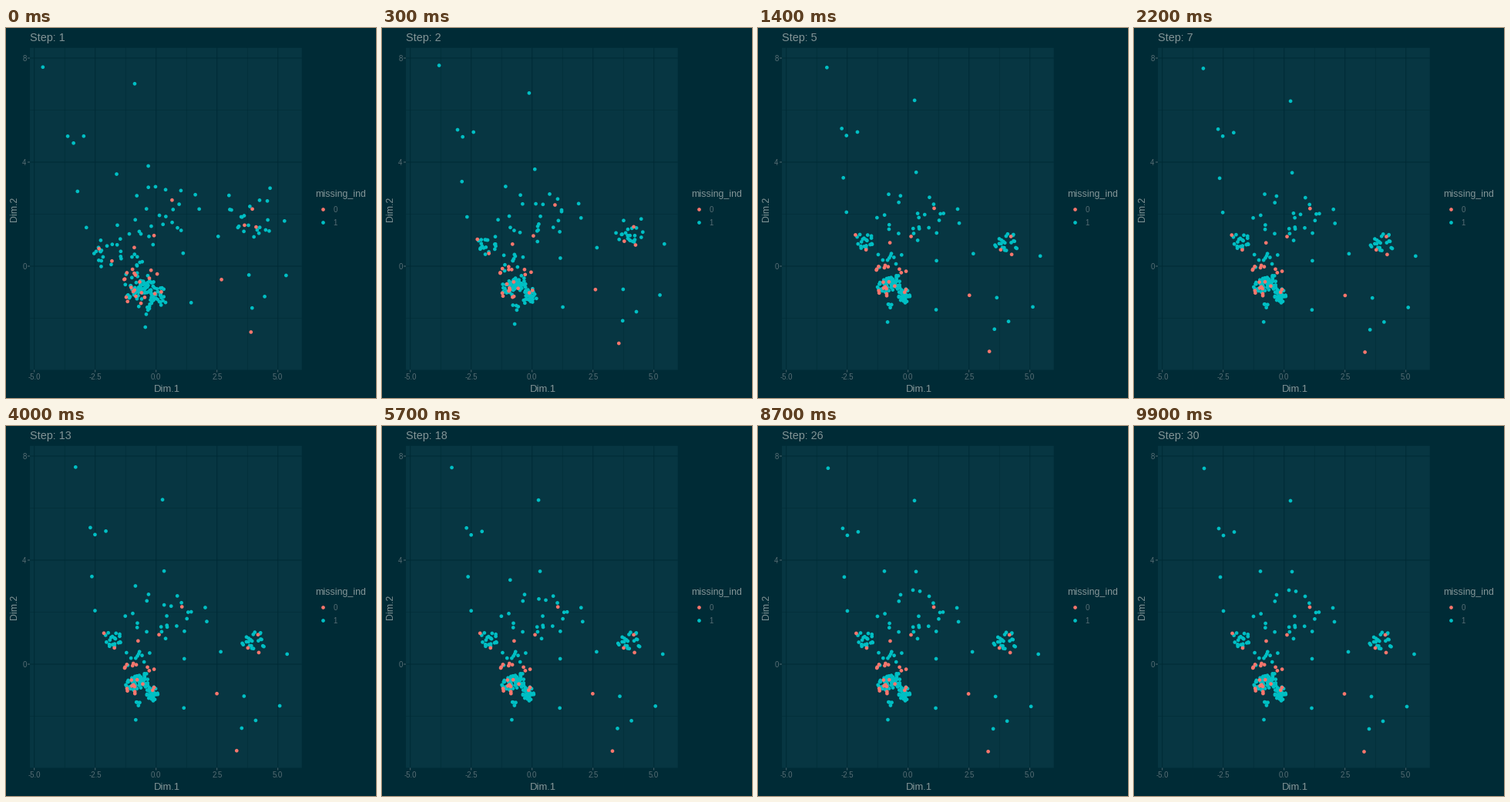
Write a matplotlib script that moves like this. It is 480 px wide and 480 px high and loops after 10000 ms.

```python
import numpy as np
import matplotlib.pyplot as plt
from matplotlib.animation import FuncAnimation
from matplotlib.patches import Rectangle

plt.rcParams["font.family"] = ["Liberation Sans", "DejaVu Sans"]

FRAMES, STEPS = 100, 30
BG, PANEL, MUTED, TEXT = "#002b36", "#073642", "#586e75", "#839496"
TEAL, SALMON = "#00bfc4", "#f8766d"
DOT = 4.7 ** 2

# Panel edges and the zero point of both axes, in pixels
L, R, T, B = 31, 383.8, 25.8, 443.5
X0, Y0 = 194.7, 309
X_UNIT, Y_UNIT = 31.6, 33.75

rng = np.random.default_rng(12)


def blob(n, cx, cy, rx, ry, spread, tilt=0.):
    """Resting places in an ellipse, plus how far each one starts off its path."""
    a, r = rng.uniform(0, 2 * np.pi, n), rng.uniform(0, 1, n) ** .6
    dx, dy = rx * r * np.cos(a), ry * r * np.sin(a)
    rest = np.stack([cx + dx, cy + dy + tilt * dx], axis=1)
    return rest, rng.uniform(-spread, spread, (n, 2))


def gather(lone, blobs):
    """Join single points and blobs into resting places and start offsets."""
    parts = [(np.array(lone, float), np.zeros((len(lone), 2)))]
    parts += [blob(*b) for b in blobs]
    return [np.concatenate(p) for p in zip(*parts)]


# Points that keep climbing after the rest of the cloud is still
CLIMBERS = [(164, 188.5), (201, 213), (210, 214.5)]

teal = gather(
    CLIMBERS + [
        (91, 55), (203, 97), (110, 133), (116, 142), (130, 137.5),
        (112, 196), (205, 189), (185, 219), (222, 221), (258, 236),
        (236, 242), (260, 254), (116, 240), (155, 247), (231, 302),
        (278, 293), (363.5, 296), (308, 351), (354, 364), (323, 383),
        (305, 393), (230.5, 366), (168.5, 381),
    ],
    [
        (16, 202, 250, 42, 27, 16),        # loose middle
        (19, 138, 277, 14, 10, 14),        # left group
        (21, 319, 277, 18, 16, 26),        # right group
        (10, 170, 301, 22, 12, 10),        # above the core
        (56, 170, 334, 15, 10, 9),         # core
        (34, 189, 346, 8, 10, 9, .4),
        (10, 180, 325, 8, 6, 9),
        (4, 170, 359, 5, 5, 6),
    ])
salmon = gather(
    [
        (228, 235), (198.5, 271), (171.5, 279), (127.5, 269), (141, 288),
        (313, 288), (326, 271), (327, 294), (273, 347.5), (298.5, 422.5),
    ],
    [
        (6, 161, 311, 9, 5, 5),
        (3, 187, 315, 6, 5, 5),
        (10, 167, 339, 15, 12, 7),
        (2, 190, 341, 3, 5, 5),
    ])

rest, offset = (np.concatenate(p) for p in zip(teal, salmon))
colors = [TEAL] * len(teal[0]) + [SALMON] * len(salmon[0])

x, up = rest[:, 0] - X0, Y0 - rest[:, 1]
# The cloud begins turned back anticlockwise, with its top drawn out
turn = np.stack([-.17 * up, -.27 * x - 5e-4 * np.maximum(up, 0) ** 2], axis=1)
start = turn + offset
# After the turn it overshoots outwards
push = np.stack([.032 * x, np.where(up > 0, -.03 * up, 5e-4 * x * up)], axis=1)
climb = np.zeros_like(rest)
climb[:len(CLIMBERS)] = 6, 29


def step_at(i):
    return 1 + (STEPS - 1) * i / (FRAMES - 1)


def places(i):
    s = step_at(i)
    begin = np.interp(s, [1, 2, 3, 3.4], [1, .25, .04, 0])
    over = np.interp(s, [3.4, 5, 8, 20, 30], [1, .5, .3, .1, 0])
    low = np.interp(s, [7, 25], [1, 0])
    return rest + begin * start + (1 - begin) * (over * push + low * climb)


fig = plt.figure(figsize=(480 / 72, 480 / 72), dpi=72, facecolor=BG)
ax = fig.add_axes([0, 0, 1, 1])
ax.set_xlim(0, 480)
ax.set_ylim(480, 0)
ax.axis("off")


def line(x, y, color, width):
    ax.plot(x, y, color=color, lw=width, zorder=1, snap=False,
            solid_capstyle="butt")


def label(x, y, s, size, color, **kw):
    return ax.text(x, y, s, fontsize=size, color=color, **kw)


ax.add_patch(Rectangle((L, T), R - L, B - T, fc=PANEL, ec="none",
                       zorder=0, snap=False))

for v in np.arange(-3.75, 5, 2.5):
    line([X0 + v * X_UNIT] * 2, [T, B], BG, .5)
for v in (6, 2, -2):
    line([L, R], [Y0 - v * Y_UNIT] * 2, BG, .5)
for v in np.arange(-5, 6, 2.5):
    px = X0 + v * X_UNIT
    line([px, px], [T, B], BG, 1)
    line([px, px], [B, B + 3], MUTED, .9)
    label(px, 456.5, f"{v:.1f}", 9.6, MUTED, ha="center")
for v in (8, 4, 0):
    py = Y0 - v * Y_UNIT
    line([L, R], [py, py], BG, 1)
    line([L - 3, L], [py, py], MUTED, .9)
    label(26.5, py + 3.9, str(v), 9.6, MUTED, ha="right")

label(191.5, 471.5, "Dim.1", 13, TEXT)
label(11, 235, "Dim.2", 12.2, TEXT, rotation=90, ha="center", va="center")
label(401.3, 219.5, "missing_ind", 12.4, TEXT)
for py, s, c in ((235, "0", SALMON), (252, "1", TEAL)):
    ax.scatter([410.5], [py], s=DOT, c=c, linewidths=0)
    label(424.8, py + 4.1, s, 9.6, MUTED)

title = label(30.8, 17.5, "", 14.4, TEXT)
dots = ax.scatter(*places(0).T, s=DOT, c=colors, linewidths=0, zorder=3)


def update(i):
    dots.set_offsets(places(i))
    title.set_text(f"Step: {round(step_at(i))}")
    return dots, title


anim = FuncAnimation(fig, update, frames=FRAMES, interval=100,
                     repeat=True, repeat_delay=0)
plt.show()
```
